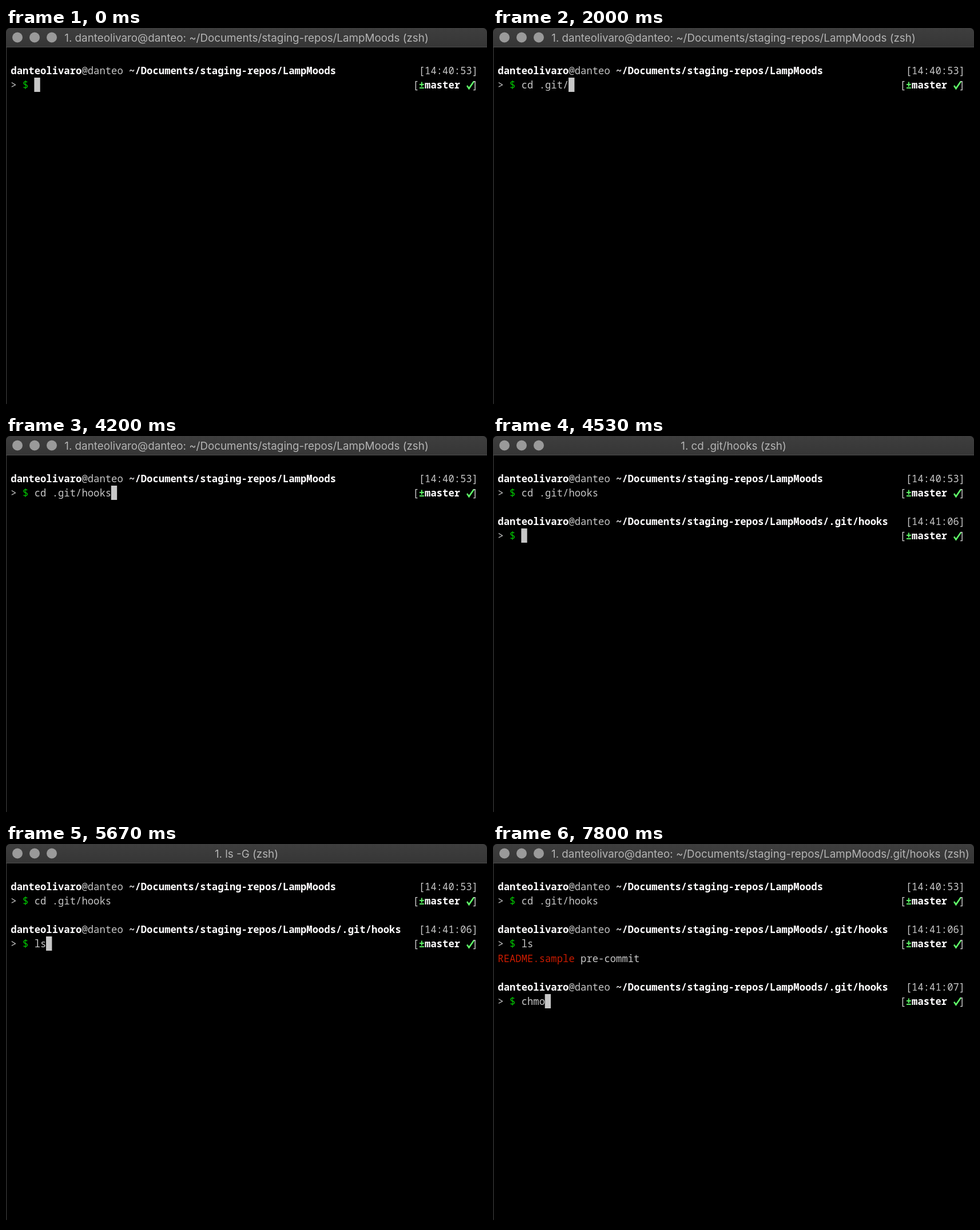
Recreate the animation shown at these times as an HTML page with a canvas. Size 841 by 666 pixels, loop 8 s.

```html
<!DOCTYPE html>
<html lang="en">
<head>
<meta charset="utf-8">
<title>Terminal</title>
<style>
  html, body { margin: 0; width: 100%; height: 100%; overflow: hidden; background: #000; }
  canvas { display: block; }
</style>
</head>
<body>
<canvas id="stage" width="841" height="666"></canvas>
<script>
const ctx = document.getElementById('stage').getContext('2d');
const W = 841, H = 666, LOOP = 8000;
const LEFT = 8.3, TOP = 62, CELL = 10.34, ROW = 25.1;
const GREY = '#c7c7c7', WHITE = '#fffeff', GREEN = '#00c200', LIME = '#5ffa68', RED = '#c91b00';

const USER = 'danteolivaro', HOST = 'danteo';
const REPO = '~/Documents/staging-repos/LampMoods', HOOKS = REPO + '/.git/hooks';
const shellTitle = path => `1. ${USER}@${HOST}: ${path} (zsh)`;

// Each prompt: when it appears, its row, and the time of every keystroke.
const prompts = [
  { at: 0, row: 0, path: REPO, clock: '14:40:53', command: 'cd .git/hooks',
    keys: [70, 130, 200, 600, 1070, 1130, 1200, 2000, 2400, 2670, 2870, 3070, 4070] },
  { at: 4530, row: 3, path: HOOKS, clock: '14:41:06', command: 'ls', keys: [5470, 5530] },
  { at: 5730, row: 7, path: HOOKS, clock: '14:41:07', command: 'chmo', keys: [7130, 7270, 7670, 7800] }
];
const titles = [
  [0, shellTitle(REPO)],
  [4470, '1. cd .git/hooks (zsh)'],
  [4600, shellTitle(HOOKS)],
  [5670, '1. ls -G (zsh)'],
  [5800, shellTitle(HOOKS)]
];

const colX = col => LEFT + col * CELL;
const rowY = row => TOP + row * ROW;

// Terminal text: one character per grid cell.
function put(col, row, text, color = GREY, weight = 400) {
  ctx.font = `${weight} 17.2px "Noto Sans Mono", monospace`;
  ctx.fillStyle = color;
  [...text].forEach((ch, i) => ctx.fillText(ch, colX(col + i), rowY(row) + 19));
}

function drawCheck(col, row) {
  const x = colX(col), y = rowY(row);
  ctx.strokeStyle = LIME;
  ctx.lineWidth = 2.6;
  ctx.beginPath();
  ctx.moveTo(x + 1.6, y + 14);
  ctx.lineTo(x + 5, y + 19);
  ctx.lineTo(x + 13.6, y + 6.5);
  ctx.stroke();
}

function drawPrompt({ row, path, clock, command, keys }, t, active) {
  put(0, row, USER, WHITE, 600);
  put(12, row, '@' + HOST);
  put(20, row, path, WHITE, 600);
  put(69, row, `[${clock}]`);

  const typed = keys.filter(k => k <= t).length;
  put(0, row + 1, '>');
  put(2, row + 1, '$', GREEN);
  put(4, row + 1, command.slice(0, typed));
  put(68, row + 1, '[');
  put(69, row + 1, '±', LIME, 600);
  put(70, row + 1, 'master', WHITE, 600);
  drawCheck(77, row + 1);
  put(78, row + 1, ']');

  if (active) {
    ctx.fillStyle = GREY;
    ctx.fillRect(colX(4 + typed) - 0.3, Math.round(rowY(row + 1)), CELL, 25);
  }
}

function drawWindow(title) {
  ctx.fillStyle = '#000';
  ctx.fillRect(0, 0, W, H);
  ctx.fillStyle = '#444';
  ctx.fillRect(0, 33, 1, H - 40);

  const bar = ctx.createLinearGradient(0, 0, 0, 33);
  bar.addColorStop(0, '#3e3e3e');
  bar.addColorStop(1, '#363636');
  ctx.fillStyle = bar;
  ctx.beginPath();
  ctx.roundRect(0, 0, W, 33, [7, 7, 0, 0]);
  ctx.fill();
  ctx.fillStyle = '#4a4a4a';
  ctx.fillRect(0, 33, W, 1);

  ctx.fillStyle = '#9a9a9a';
  for (const x of [20, 50, 80]) {
    ctx.beginPath();
    ctx.arc(x, 16.5, 9, 0, Math.PI * 2);
    ctx.fill();
  }

  // Centred, unless that would run into the buttons.
  ctx.font = '400 18.8px Inter, sans-serif';
  ctx.fillStyle = '#b4b4b4';
  ctx.fillText(title, Math.max(102, 420.5 - ctx.measureText(title).width / 2), 23.5);
}

function draw() {
  const t = performance.now() % LOOP;
  drawWindow(titles.findLast(([at]) => at <= t)[1]);
  const shown = prompts.filter(p => p.at <= t);
  shown.forEach((p, i) => drawPrompt(p, t, i === shown.length - 1));
  if (shown.length === 3) {
    put(0, 5, 'README.sample', RED);
    put(14, 5, 'pre-commit');
  }
  requestAnimationFrame(draw);
}

draw();
</script>
</body>
</html>
```
